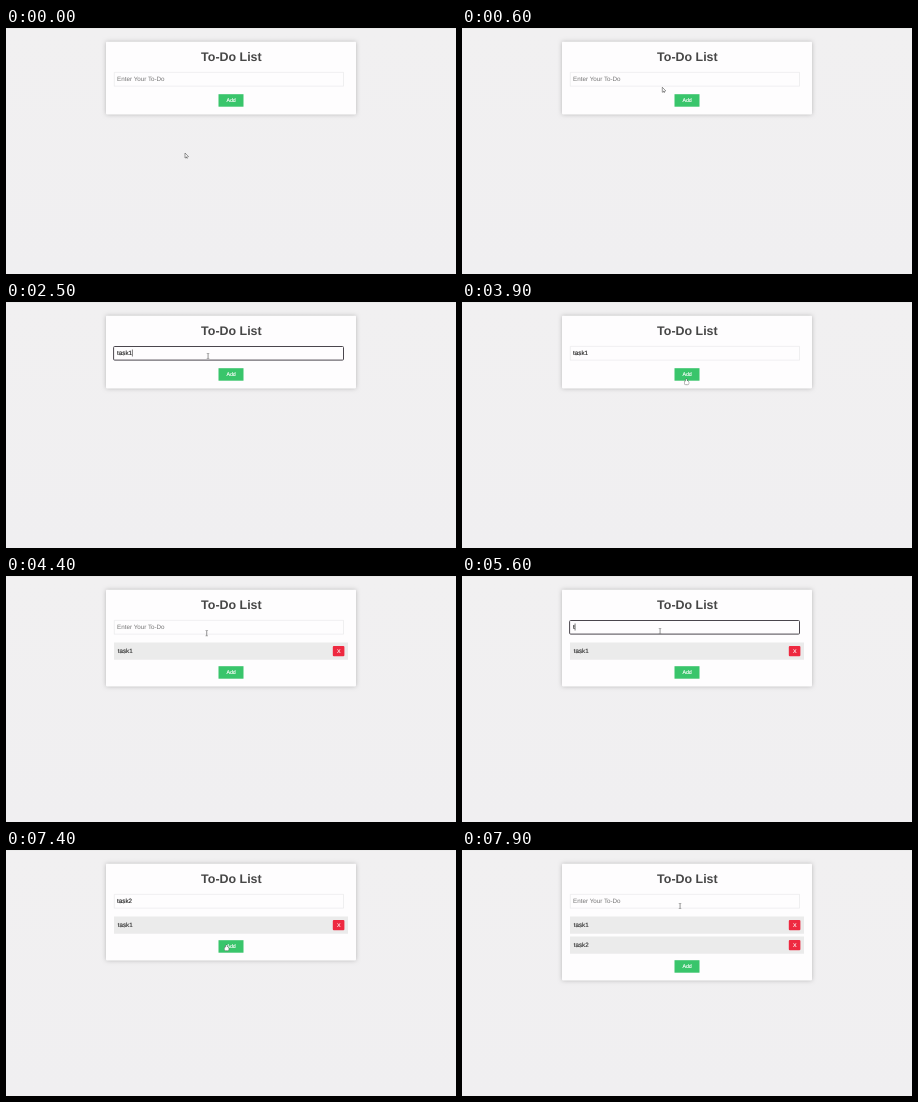
Recreate the animation shown at these times as an HTML page with a canvas. Size 450 by 246 pixels, loop 8000 ms.

```html
<!DOCTYPE html>
<html lang="en">
<head>
<meta charset="utf-8">
<title>To-Do List</title>
<style>
html, body { margin: 0; width: 100%; height: 100%; overflow: hidden; background: #f0eff0; }
canvas { display: block; width: 450px; height: 246px; }
</style>
</head>
<body>
<canvas id="stage"></canvas>
<script>
const W = 450, H = 246, LOOP = 8000, STEP = 100, BLINK = 530, TYPING = 1000;
const FONT = '"Liberation Sans", Arial, sans-serif';
const canvas = document.getElementById('stage');
const ctx = canvas.getContext('2d');
const dpr = window.devicePixelRatio || 1;
canvas.width = W * dpr;
canvas.height = H * dpr;

// Each round: focus the field, type a word, press Add. A rhythm above 1 slows the later keys.
const rounds = [
  { focus: 800, type: 1500, rhythm: 1, word: 'task1', blur: 3800, add: 4000 },
  { focus: 4600, type: 5600, rhythm: 1.8, word: 'task2', blur: 7300, add: 7500 }
];

const start = { x: 179, y: 125 };
const glides = [
  { at: 100, time: 600, x: 202, y: 54 },
  { at: 3100, time: 500, x: 224.5, y: 77 },
  { at: 4000, time: 500, x: 198, y: 55 },
  { at: 6800, time: 400, x: 220.5, y: 95 },
  { at: 7500, time: 300, x: 218, y: 56 }
];

function ease(k) {
  k = Math.min(1, Math.max(0, k));
  return k * k * (3 - 2 * k);
}

function pointerAt(t) {
  return glides.reduce((p, g) => {
    const e = ease((t - g.at) / g.time);
    return { x: p.x + (g.x - p.x) * e, y: p.y + (g.y - p.y) * e };
  }, start);
}

function keyTimes({ word, type, rhythm }) {
  return [...word].map((_, i) => type + TYPING * (i / (word.length - 1)) ** rhythm);
}

function stateAt(t) {
  const items = rounds.filter(r => t >= r.add).map(r => r.word);
  const r = rounds.find(r => t >= r.focus && t < r.add);
  if (!r) return { items, text: '', focused: false, caret: false };
  const typed = keyTimes(r).filter(k => k <= t);
  const last = typed.length ? typed[typed.length - 1] : r.focus;
  const focused = t < r.blur;
  const caret = focused && Math.floor((t - last) / BLINK) % 2 === 0;
  return { items, text: r.word.slice(0, typed.length), focused, caret };
}

function rect(x, y, w, h, fill, radius = 0) {
  ctx.fillStyle = fill;
  ctx.beginPath();
  ctx.roundRect(x, y, w, h, radius);
  ctx.fill();
}

function label(text, x, y, size, color, align = 'left', weight = '') {
  ctx.font = `${weight} ${size}px ${FONT}`;
  ctx.textAlign = align;
  ctx.fillStyle = color;
  ctx.fillText(text, x, y);
}

// Small text with a hairline to give it body
function smallLabel(text, x, y, size, color, align) {
  label(text, x, y, size, color, align);
  ctx.strokeStyle = color;
  ctx.lineWidth = 0.14;
  ctx.strokeText(text, x, y);
}

function drawInput(s) {
  ctx.beginPath();
  if (s.focused) {
    ctx.roundRect(107.6, 44.5, 229.9, 13.6, 1);
    ctx.strokeStyle = '#4a464d';
    ctx.lineWidth = 1;
  } else {
    ctx.rect(108.3, 44.4, 229.2, 13.8);
    ctx.strokeStyle = '#dedee0';
    ctx.lineWidth = 0.45;
  }
  ctx.stroke();
  if (s.text) smallLabel(s.text, 111.1, 53.1, 6.25, '#222');
  else label('Enter Your To-Do', 111.1, 53.1, 6.25, '#757575');
  if (s.caret) {
    ctx.font = `6.25px ${FONT}`;
    rect(111 + ctx.measureText(s.text).width, 47.6, 0.6, 6.8, '#222');
  }
}

function drawItem(word, y) {
  rect(108, y, 234, 17.3, '#ebebeb');
  smallLabel(word, 111.7, y + 10.7, 6.25, '#333');
  rect(326.8, y + 3.4, 11.6, 10.3, '#ee2940', 1);
  smallLabel('X', 332.7, y + 10.5, 5.4, '#fff', 'center');
}

function drawBeam() {
  rect(-0.3, -2.6, 0.7, 5.2, '#666');
  for (const y of [-2.9, 2.3]) rect(-1.3, y, 2.6, 0.6, '#888');
}

function drawHand() {
  ctx.beginPath();
  ctx.roundRect(-2, 2, 4.2, 3.6, 1.2);
  ctx.roundRect(-0.8, 0, 1.2, 4, 0.6);
  ctx.strokeStyle = '#444';
  ctx.lineWidth = 0.8;
  ctx.stroke();
  ctx.fillStyle = '#fff';
  ctx.fill();
}

function drawArrow() {
  ctx.beginPath();
  ctx.moveTo(0, 0);
  ctx.lineTo(0, 5);
  ctx.lineTo(3.5, 3.6);
  ctx.closePath();
  ctx.moveTo(1.2, 3.5);
  ctx.lineTo(2.3, 5.7);
  ctx.fillStyle = '#fff';
  ctx.fill();
  ctx.strokeStyle = '#444';
  ctx.lineWidth = 0.55;
  ctx.stroke();
}

function drawPointer({ x, y }, btnY) {
  const inside = (x0, y0, w, h) => x >= x0 && x <= x0 + w && y >= y0 && y <= y0 + h;
  ctx.save();
  ctx.translate(x, y);
  if (inside(108, 44, 230, 14.5)) drawBeam();
  else if (inside(212.5, btnY, 25, 12.6)) drawHand();
  else drawArrow();
  ctx.restore();
}

function draw(t) {
  const s = stateAt(t);
  const n = s.items.length;
  const grow = n ? 4 + 20 * n : 0;
  const btnY = 66.2 + grow;

  ctx.setTransform(dpr, 0, 0, dpr, 0, 0);
  ctx.textRendering = 'geometricPrecision';
  const bg = ctx.createLinearGradient(0, 0, 0, H);
  bg.addColorStop(0, '#f1f0f1');
  bg.addColorStop(1, '#f0eff1');
  rect(0, 0, W, H, bg);
  rect(0, 0, W, 0.8, '#e8e8e9');

  ctx.shadowColor = 'rgba(0,0,0,0.24)';
  ctx.shadowBlur = 4 * dpr;
  rect(100, 13.7, 250, 72.7 + grow, '#fefdfe', 0.8);
  ctx.shadowColor = 'transparent';

  label('To-Do List', 225.4, 33, 12.45, '#474747', 'center', 'bold');
  drawInput(s);
  s.items.forEach((word, i) => drawItem(word, 66.5 + 20 * i));
  rect(212.5, btnY, 25, 12.5, '#39c56b');
  smallLabel('Add', 225.1, btnY + 8, 5.3, '#fff', 'center');
  drawPointer(pointerAt(t), btnY);
}

function tick(now) {
  draw(Math.floor((now % LOOP) / STEP) * STEP);
  requestAnimationFrame(tick);
}
draw(0);
requestAnimationFrame(tick);
</script>
</body>
</html>
```
